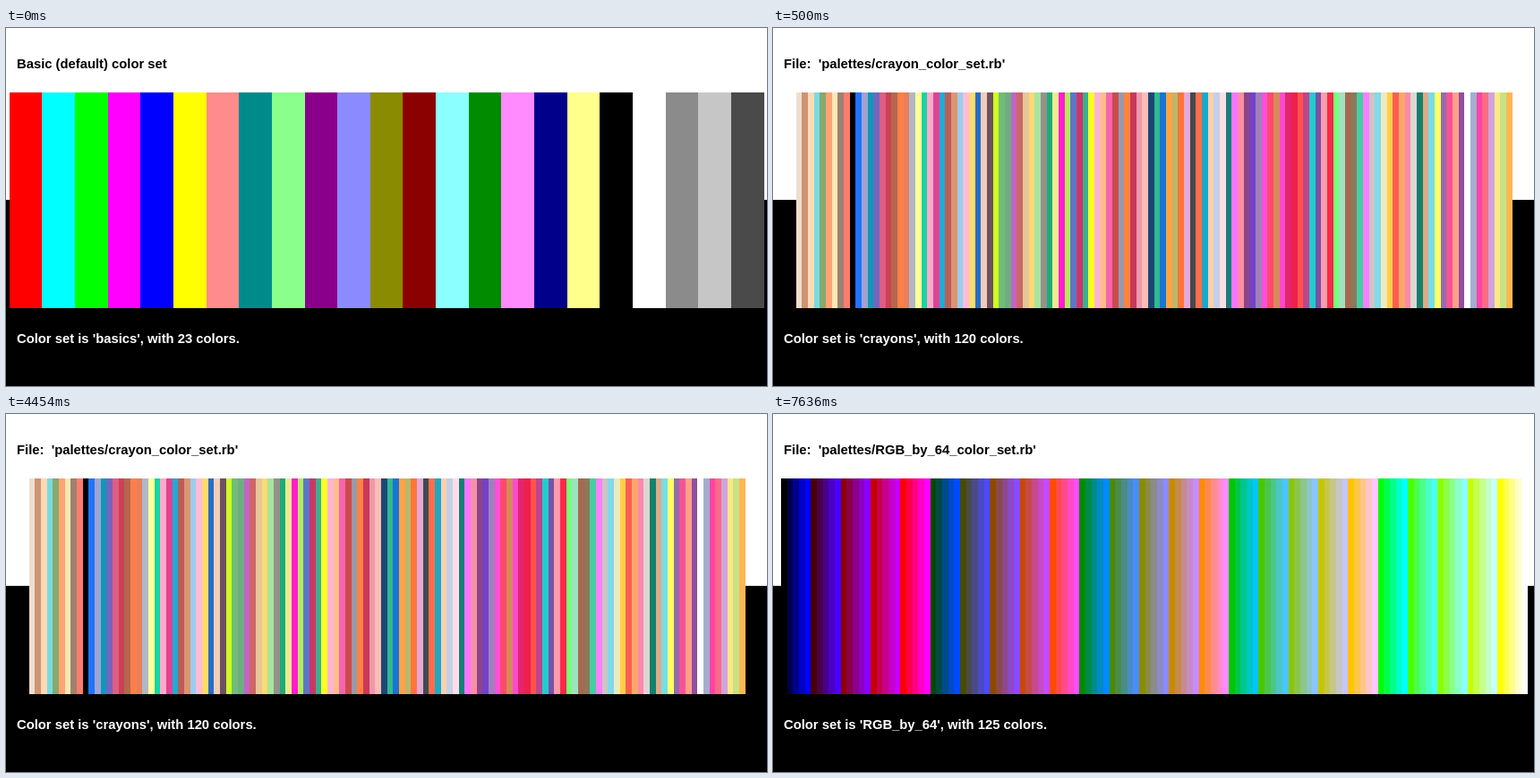
An HTML page for the animation above (8000 ms loop, 850 px wide and 400 px high).

```html
<!DOCTYPE html>
<html lang="en">
<head>
<meta charset="utf-8">
<title>Color sets</title>
<style>
  html, body { margin: 0; width: 100%; height: 100%; overflow: hidden; background: #fff; }
  svg { display: block; width: 850px; height: 400px; }
  text {
    font: bold 14.8px "Arial Rounded MT Bold", "Liberation Sans", Arial, sans-serif;
    white-space: pre;
  }
</style>
</head>
<body>
<svg id="stage" viewBox="0 0 850 400">
  <rect width="850" height="192" fill="#fff"/>
  <rect y="192" width="850" height="208" fill="#000"/>
</svg>
<script>
const LOOP = 8000;
const TOP = 72, HEIGHT = 241;
const stage = document.getElementById('stage');

const basics = `
  f00 0ff 0f0 f0f 00f ff0 ff8b8b 008b8b 8bff8b 8b008b 8b8bff 8b8b00
  8b0000 8bffff 008b00 ff8bff 00008b ffff8b 000 fff 8b8b8b c6c6c6 4a4a4a`;

const crayons = `
  efdecd cd9575 fdd9b5 78dbe2 87a96b ffa474 fae7b5 9f8170 fd7c6e 000000
  1f75fe a2a2d0 0d98ba 7366bd de5d83 cb4154 b4674d ff7f49 ea7e5d b0b7c6
  ffff99 1cd3a2 ffaacc dd4492 1dacd6 bc5d58 dd9475 9aceeb ffbcd9 fddb6d
  2b6cc4 efcdb8 6e5160 ceff1d 71bc78 6dae81 c364c5 cc6666 e7c697 fcd975
  a8e4a0 95918c 1cac78 f0e891 ff1dce b2ec5d 5d76cb ca3767 3bb08f fefe22
  fcb4d5 ffbd88 f664af cd4a4a 979aaa ff8243 c8385a ef98aa fdbcb4 1a4876
  30ba8f 1974d2 ffa343 bab86c ff7538 e6a8d7 414a4c ff6e4a 1ca9c9 ffcfab
  c5d0e6 fddde6 158078 fc74fd f78fa7 8e4585 7442c8 9d81ba fe4eda ff496c
  d68a59 ff48d0 e3256b ee204d ff5349 c0448f 1fcecb 7851a9 ff9baa fc2847
  76ff7a 9fe2bf a5694f 8a795d 45cea2 fb7efd cdc5c2 80daeb eceabe ffcf48
  fd5e53 faa76c fc89ac dbd7d2 17806d deaa88 77dde7 ffff66 926eae f75394
  ffa089 8f509d ffffff a2add0 ff43a4 fc6c85 cda4de fce883 c5e384 ffb653`;

const parse = list => list.trim().split(/\s+/).map(hex => '#' + hex);

// Green varies slowest, blue fastest.
function rgbCube() {
  const levels = [0, 74, 139, 198, 255];
  return levels.flatMap(g => levels.flatMap(r => levels.map(b => `rgb(${r},${g},${b})`)));
}

function add(parent, tag, attrs, content = '') {
  const el = document.createElementNS('http://www.w3.org/2000/svg', tag);
  for (const key in attrs) el.setAttribute(key, attrs[key]);
  el.textContent = content;
  return parent.appendChild(el);
}

function makeScene({ start, title, name, colors, left, pitch }) {
  const group = add(stage, 'g', { visibility: 'hidden' });
  const count = colors.length;
  const edge = i => i === count ? Math.round(left + pitch * i) : Math.floor(left + pitch * i);
  colors.forEach((fill, i) => add(group, 'rect', {
    x: edge(i), y: TOP, width: edge(i + 1) - edge(i), height: HEIGHT,
    fill, 'shape-rendering': 'crispEdges'
  }));
  add(group, 'text', { x: 12, y: 45, fill: '#000' }, title);
  add(group, 'text', { x: 12, y: 352, fill: '#fff' },
    `Color set is '${name}', with ${count} colors.`);
  return { start, group };
}

const scenes = [
  { start: 0, title: 'Basic (default) color set', name: 'basics',
    colors: parse(basics), left: 4.11, pitch: 36.655 },
  { start: 500, title: "File:  'palettes/crayon_color_set.rb'", name: 'crayons',
    colors: parse(crayons), left: 26.01, pitch: 20 / 3 },
  { start: 7090, title: "File:  'palettes/RGB_by_64_color_set.rb'", name: 'RGB_by_64',
    colors: rgbCube(), left: 9.34, pitch: 20 / 3 }
].map(makeScene);

const origin = performance.now();

function draw() {
  const t = Math.max(0, performance.now() - origin) % LOOP;
  const current = scenes.filter(s => s.start <= t).pop();
  for (const s of scenes) {
    s.group.setAttribute('visibility', s === current ? 'visible' : 'hidden');
  }
  requestAnimationFrame(draw);
}
draw();
</script>
</body>
</html>
```
